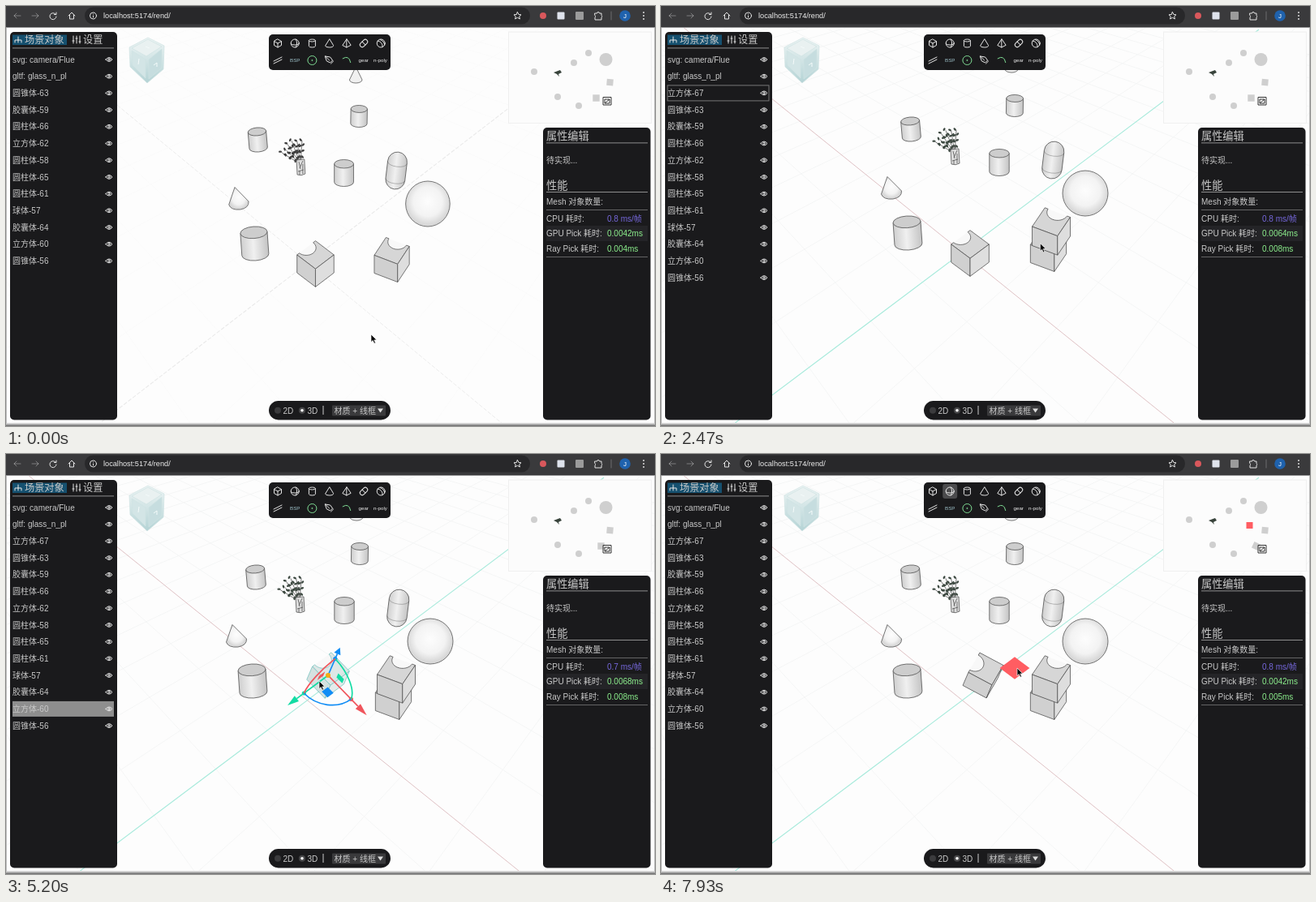
Recreate the animation shown at these times as an HTML page. Size 800 px wide and 518 px high, loop 8 s.

```html
<!DOCTYPE html>
<html lang="zh">
<head>
<meta charset="utf-8">
<title>Scene editor</title>
<style>
html, body { margin: 0; width: 100%; height: 100%; overflow: hidden; background: #fff; }
svg { display: block; width: 800px; height: 518px; }
text { font-family: "Liberation Sans", Arial, "Noto Sans CJK SC", "Noto Sans CJK", sans-serif; font-size: 10px; fill: #c9c9c9; }
.line { fill: none; stroke: #e4e4e4; stroke-width: 1; stroke-linecap: round; stroke-linejoin: round; }
.edge { stroke: #555; stroke-width: .8; stroke-linejoin: round; }
.title { font-size: 13.2px; }
.tab { font-size: 12.2px; }
.tiny { font-size: 6.2px; fill: #eee; }
.x-axis { stroke: #dcbcbf; stroke-width: .9; }
.y-axis { stroke: #a6eadb; stroke-width: 1.1; }
.grid { stroke: #f3f4f4; stroke-width: .8; fill: none; }
.leaf { fill: #3d4941; }
.plain .x-axis, .plain .y-axis { stroke: #eaeaea; stroke-dasharray: 5 2; }
.plain .leaf { fill: #3c3c3c; }
.plain .grid { stroke: #fafafa; }
.hot .edge { stroke: #63b9b5; }
.num { fill: #8df08d; }
</style>
</head>
<body>
<svg viewBox="0 0 800 518">
  <defs>
    <linearGradient id="side"><stop offset="0" stop-color="#cfcfcf"/><stop offset=".45" stop-color="#f0f0f0"/><stop offset="1" stop-color="#c4c4c4"/></linearGradient>
    <radialGradient id="ball" cx=".5" cy=".45"><stop offset="0" stop-color="#fdfdfd"/><stop offset=".65" stop-color="#f3f3f3"/><stop offset="1" stop-color="#d8d8d8"/></radialGradient>
    <linearGradient id="ice" x2="0" y2="1"><stop offset="0" stop-color="#eef5f5"/><stop offset="1" stop-color="#b4d3d5"/></linearGradient>
    <clipPath id="view"><rect y="27" width="800" height="487"/></clipPath>
  </defs>
  <rect width="800" height="518" fill="#fdfdfd"/>
  <g clip-path="url(#view)">
    <g id="scene"><g id="props"></g><g id="blocks"></g></g>
    <g id="gizmo"></g>
  </g>
  <g id="ui"></g>
  <g id="live"></g>
  <path id="cursor" d="M0 0V9.6L2.2 7.5 3.8 11.2 5.5 10.4 3.9 6.9H7Z" fill="#000" stroke="#fff" stroke-width=".7"/>
</svg>
<script>
const LOOP = 8000;
const TOOL = 1250, AIM = 1750, PLACE = 2300, PICK = 2900, CLEAR = 6850, TOOL_AGAIN = 7440, NEXT_TOOL = 7600, DROP = 7760;
const ORBIT = [70, 800], TILT = [3550, 4000], SLIDE = [4200, 4600], TURN = [5400, 6400];
const RED = '#f0555c', GREEN = '#12dca4', BLUE = '#118df5', GOLD = '#f2ac12', HOT = '#ff5d62';
const $ = id => document.getElementById(id);

const line = (d, extra = '') => `<path class="line" d="${d}" ${extra}/>`;
const text = (x, y, s, extra = '') => `<text x="${x}" y="${y}" ${extra}>${s}</text>`;
const rect = (x, y, w, h, fill, r = 0, extra = '') =>
  `<rect x="${x}" y="${y}" width="${w}" height="${h}" rx="${r}" fill="${fill}" ${extra}/>`;
const dot = (x, y, r, fill, extra = '') => `<circle cx="${x}" cy="${y}" r="${r}" fill="${fill}" ${extra}/>`;
const ring = (x, y, r) => dot(x, y, r, 'none', 'class="line"');
const poly = (pts, fill, extra = 'class="edge"') => `<polygon points="${pts.join(' ')}" fill="${fill}" ${extra}/>`;
const range = n => [...Array(n).keys()];
const random = n => Math.abs(Math.sin(n * 78.23) * 437.58) % 1;
const within = (t, from, to) => t >= from && t < to;

// Smooth 0..1 progress through a time span.
function ease(t, [from, to]) {
  const u = Math.min(1, Math.max(0, (t - from) / (to - from)));
  return u * u * (3 - 2 * u);
}

// Where the pointer rests or turns: time, x, y.
const stops = [
  [0, 450, 405], [800, 445, 330], [1300, 336, 45], [1800, 477, 291], [2350, 477, 291],
  [2950, 386, 307], [3500, 404, 295], [4100, 395, 282], [4600, 412, 248], [4880, 405, 383],
  [5200, 386, 280], [6550, 406, 308], [6900, 415, 386], [7480, 335, 46], [7930, 439, 264]
];
function pointer(t) {
  const i = Math.max(1, stops.findIndex(s => s[0] > t));
  if (t >= stops.at(-1)[0]) return stops.at(-1).slice(1);
  const [a, b] = [stops[i - 1], stops[i]], e = ease(t, [a[0], b[0]]);
  return [a[1] + (b[1] - a[1]) * e, a[2] + (b[2] - a[2]) * e];
}

// Orthographic view from 48 degrees above, turned by 45.
const PITCH = .835, DIAG = Math.SQRT1_2;
const project = ([x, y, z]) => [(x - y) * DIAG, (x + y) * DIAG * Math.sin(PITCH) - z * Math.cos(PITCH)];
// Screen vectors of a body's axes after tilting about y, then turning about its own z.
function axes(tilt, turn) {
  const [c, s, k, w] = [Math.cos(tilt), Math.sin(tilt), Math.cos(turn), Math.sin(turn)];
  return [[c * k, w, -s * k], [-c * w, k, s * w], [s, 0, c]].map(project);
}
const mix = (origin, ...terms) => terms.reduce((p, [n, v]) => [p[0] + n * v[0], p[1] + n * v[1]], origin);

// Cube with a spherical bite in the rear top edge on side -u.
function block(center, half, [r, g, b], u, v, active) {
  const at = (i, j, k) => mix(center, [i * half, r], [j * half, g], [k * half, b]);
  const onTop = (i, j) => mix(center, [half, b], [i * half, u], [j * half, v]);
  const bite = range(17).map(i => {
    const a = i / 16 * Math.PI;
    return onTop(-1 + .75 * Math.sin(a), .75 * Math.cos(a));
  });
  const [top, left, right] = active ? ['#d9e4e3', '#cfdddc', '#e0e9e8'] : ['#d6d6d6', '#d0d0d0', '#dedede'];
  return `<g class="${active ? 'hot' : ''}" opacity="${active ? .85 : 1}">` +
    poly(bite, '#f8f8f8', '') + poly([onTop(-1, 1), ...bite, onTop(-1, -1), onTop(1, -1), onTop(1, 1)], top) +
    poly([at(-1, 1, 1), at(1, 1, 1), at(1, 1, -1), at(-1, 1, -1)], left) +
    poly([at(1, 1, 1), at(1, -1, 1), at(1, -1, -1), at(1, 1, -1)], right) + '</g>';
}

function pose(t) {
  const slide = ease(t, SLIDE);
  return { center: [381 + 16 * slide, 305 - 32 * slide], frame: axes(.3 * ease(t, TILT), -.36 * ease(t, TURN)) };
}

function drawBlocks(t, [x, y]) {
  const { center, frame } = pose(t), [r, g] = frame;
  const still = axes(0, -.32), base = [477.5, 300], aiming = within(t, AIM, PLACE);
  let out = block(center, 16.5, frame, r, g, within(t, PICK, CLEAR));
  out += block(base, 16.5, still, still[1], still[0], aiming);
  if (t >= PLACE) out += block([481, 278], 17.5, still, still[1], still[0], false);
  const face = (mid, size, [p, q]) => [[1, 1], [1, -1], [-1, -1], [-1, 1]].map(([i, j]) => mix(mid, [i * size, p], [j * size, q]));
  if (aiming) out += poly(face(mix(base, [16.5, still[2]]), 16.5, still), '#fb3034', 'opacity=".85"');
  if (within(t, 1600, AIM) || t > DROP) out += poly(face([x - 3, y], 13, axes(0, 0)), HOT, '');
  $('blocks').innerHTML = out;
}

function drawGizmo(t) {
  if (!within(t, PICK, CLEAR)) { $('gizmo').innerHTML = ''; return; }
  const { center, frame } = pose(t), size = 42;
  const facing = t > 6000 ? -1 : 1;
  const [r, g, b] = frame.map((v, i) => v.map(n => n * size * (i ? 1 : facing)));
  const at = (p, i, q = p, j = 0) => mix(center, [i, p], [j, q]);
  const arc = (p, q, color) => `<path d="M${at(p, 1)}C${at(p, 1, q, .55)} ${at(p, .55, q, 1)} ${at(q, 1)}" fill="none" stroke="${color}" stroke-width="1.7"/>`;
  const pad = (p, q, color) => poly([at(p, .28, q, .28), at(p, .53, q, .28), at(p, .53, q, .53), at(p, .28, q, .53)], color, '');
  const arrow = (p, color) => {
    const len = Math.hypot(...p), across = [-p[1] / len, p[0] / len], neck = at(p, 1.3);
    return `<path d="M${center}L${neck}" stroke="${color}" stroke-width="1.7"/>` + dot(...at(p, 1), 2.6, color) +
      poly([at(p, 1.68), mix(neck, [4.3, across]), mix(neck, [-4.3, across])], color, '');
  };
  $('gizmo').innerHTML = pad(b, g, RED) + pad(b, r, GREEN) + pad(r, g, BLUE) +
    arrow(g, GREEN) + arrow(r, RED) + arrow(b, within(t, TILT[1], SLIDE[1]) ? GOLD : BLUE) +
    arc(r, g, t > TURN[0] ? GOLD : BLUE) + arc(b, r, within(t, ...TILT) ? GOLD : GREEN) + arc(b, g, RED) + dot(...center, 3, GOLD);
}

function ground() {
  const o = [377, 300], ends = [[1044, -207], [-290, -207]];
  const d = ends.flatMap((along, n) => range(22).filter(i => i !== 7).map(i => {
    const k = (i - 7) * .075, far = ends[1 - n];
    const p = mix([0, 0], [1 / (1 + k), o], [k / (1 + k), along]);
    return `M${mix([0, 0], [3, p], [-2, far])}L${far}`;
  }));
  return `<path class="grid" d="${d.join('')}"/><path class="x-axis" d="M16 17L632 514"/><path class="y-axis" d="M77 525L737 29"/>`;
}

function cylinder(x, y, rx, h, lean) {
  const ry = rx * .43, top = y - h / 2 + ry, low = y + h / 2 - ry;
  return `<g class="edge" transform="rotate(${lean} ${x} ${y})">
    <path fill="url(#side)" d="M${x - rx} ${top}V${low}A${rx} ${ry} 0 0 0 ${x + rx} ${low}V${top}Z"/>
    <ellipse cx="${x}" cy="${top}" rx="${rx}" ry="${ry}" fill="#cdcdcd"/></g>`;
}

function plant() {
  const stems = range(6).map(n => {
    const a = -2.6 + n * .22, len = 24 + 9 * random(n + 1);
    const [dx, dy] = [len * Math.cos(a), len * Math.sin(a)];
    const leaves = range(6).map(i => {
      const u = 1 - i * .13, side = i % 2 ? 1.8 : -1.8;
      return `<ellipse class="leaf" rx="2.1" ry="1.2" transform="translate(${362 + dx * u + side} ${182 + dy * u + side * .6}) rotate(${random(i + n * 9) * 180})"/>`;
    });
    return `<path class="edge" d="M362 182l${dx} ${dy}"/>` + leaves.join('');
  });
  return stems.join('') + `<path d="M357 177L358 195Q363 197 368 194L367 176Z" fill="#dedede" class="edge"/>
    <path class="edge" fill="none" d="M360 179L362 188M365 178L361 187M359 191L366 189M365 182V194M361 190V195"/>`;
}

$('props').innerHTML = ground() + `<path class="edge" fill="#f0f0f0" d="M432 62L424 78A8 4 0 0 0 440 78Z"/>` +
  cylinder(436, 123, 10.4, 27, 1) + cylinder(308, 152, 11.5, 30, -5) + plant() + cylinder(417, 193, 12.2, 33, 0) +
  `<g class="edge" transform="rotate(7 483 190)">${rect(471, 167, 24.5, 46, 'url(#side)', 12.2)}<path fill="none" opacity=".45" d="M471 180A12 5 0 0 0 495.5 180M471 201A12 5 0 0 0 495.5 201"/></g>` +
  dot(523, 231, 28, 'url(#ball)', 'class="edge"') +
  `<path class="edge" fill="url(#ball)" d="M279 210.5L271.5 232Q274 239 286 238Q297 236 296.5 228Z"/>` + cylinder(304, 280, 17, 42, -4);

const names = ['svg: camera/Flue', 'gltf: glass_n_pl', '圆锥体-63', '胶囊体-59', '圆柱体-66', '立方体-62', '圆柱体-58',
  '圆柱体-65', '圆柱体-61', '球体-57', '胶囊体-64', '立方体-60', '圆锥体-56'];
const namesAfter = names.toSpliced(2, 0, '立方体-67');
const rowY = i => 66 + i * 20.7;
const eye = y => line(`M123 ${y}Q127 ${y - 5} 131 ${y}Q127 ${y + 5} 123 ${y}Z`) + ring(127, y, 1.3);
const list = items => items.map((s, i) => text(8, rowY(i) + 3.6, s) + eye(rowY(i))).join('');

function browser() {
  return rect(0, 0, 800, 26.5, '#3a3a3c') + rect(97, 1.5, 549, 21, '#28282a', 10.5) +
    line('M18 12H10M13 9L10 12 13 15M32 12H40M37 9L40 12 37 15', 'opacity=".4"') +
    line('M61 10A4 4 0 1 0 62 13M62 8V10.5H59.5M77 12L81 8 85 12M78.5 11V16H83.5V11') +
    ring(107.5, 12, 4) + line('M107.5 12V14M107.5 10V10.1') +
    text(120, 15.4, 'localhost:5174/rend/', 'style="font-size:9.2px;fill:#eee"') +
    line('M630.5 7.5L632 10.5 635 10.8 632.7 12.9 633.4 16 630.5 14.3 627.6 16 628.3 12.9 626 10.8 629 10.5Z') +
    dot(662, 12, 4, '#d9585c') + rect(679.5, 7.5, 9, 9, '#dfe3ec', 1) + rect(702, 7, 10, 10, '#9b9b9b', 1) +
    line('M726 9H728.5A1.5 1.5 0 0 1 731.5 9H734V11.5A1.5 1.5 0 0 1 734 14V17H726V14A1.5 1.5 0 0 0 726 11.5Z') +
    line('M746 7V17', 'opacity=".3"') + dot(763, 12, 6.8, '#1f62ad') + text(761, 15, 'J', 'style="font-size:8px;fill:#fff"') +
    range(3).map(i => dot(786, 8 + 4 * i, 1, '#ddd')).join('') +
    rect(0, 514.5, 800, 3.5, '#c4c4c4') + rect(0, 516.5, 800, 1.5, '#777') + rect(0, 27, 1, 488, '#bbb') + rect(799, 27, 1, 488, '#bbb');
}

function viewCube() {
  return `<g stroke="#cfe2e3" stroke-width=".7" stroke-linejoin="round"><path fill="url(#ice)" d="M175 39L195 49 194 78 174 95 153 75 152 51Z"/>
    <path fill="#e9f1f1" d="M175 41L192 50 173 62 155 52Z"/><path fill="#d3e5e6" d="M155 55L172 66V89L156 73Z"/>
    <path fill="#c6dddf" d="M176 66L192 53V76L176 90Z"/></g>
    <path fill="none" stroke="#f4fafa" d="M164 65L163 72M182 73L186 70V75M172 50L177 52"/>`;
}

function toolbar() {
  const [a, b, c, d, e, f, g] = range(7).map(i => 335 + i * 21.2);
  return rect(324, 35, 150, 44, '#1a1a1c', 5) + rect(0, 37, 18, 18, '#4b4b4d', 3, 'id="tool"') +
    line(`M${a} 41l4.5 2.5v5l-4.5 2.5 -4.5 -2.5v-5ZM${a - 4.5} 43.5l4.5 2.5 4.5 -2.5M${a} 46v5`) +
    ring(b, 46, 5) + line(`M${b - 5} 46a5 2 0 0 0 10 0M${b + 1} 41q3 5 0 10`) +
    line(`M${c - 4} 42.5v7a4 1.5 0 0 0 8 0v-7a4 1.5 0 0 0 -8 0a4 1.5 0 0 0 8 0`) +
    line(`M${d} 41l-5 8a5 2 0 0 0 10 0Z`) + line(`M${e} 41l-5 7.5 5 2.5 5 -2.5Zv10`) +
    `<g transform="rotate(45 ${f} 46)">${rect(f - 2.8, 40.5, 5.6, 11, 'none', 2.8, 'class="line"')}${line(`M${f - 2.8} 46h5.6`)}</g>` +
    ring(g, 46, 5) + line(`M${g - 4} 43q6 1 6 7.5M${g - 1} 41.5q5 1.5 5.5 6.5`) +
    line(`M${a - 5} 68l10 -5M${a - 5} 71l10 -5`) + text(350, 69.3, 'BSP', 'class="tiny" style="fill:#9fc3cb"') +
    `<g style="stroke:#7fdc94" fill="none">${dot(c, 67, 5.5, 'none')}${dot(c, 67, .6, 'none')}<path d="M${e - 5} 65q8 -5 10 5"/></g>` +
    line(`M${d - 5} 62l6 1 3 4 -3 3 -4 -2Zl5 5M${d + 2} 71l3 -3`) + text(434.5, 69, 'gear', 'class="tiny"') + text(453, 69, 'n-poly', 'class="tiny"');
}

function miniMap() {
  const grey = '#cfcfcf', spots = [[651, 81], [700, 70], [718, 58], [680, 112], [706, 123]];
  return rect(619.5, 32, 176, 112.5, '#fcfcfc', 0, 'stroke="#f0f0f0"') +
    spots.map(p => dot(...p, 4, grey)).join('') + dot(739.5, 66, 8, grey) +
    '<path d="M675 82L683 79 685 82 681 84 682 87 679 84Z" fill="#39443c"/>' +
    rect(740.5, 90, 8, 8, grey, 0, 'id="mapTop" transform="rotate(5 744 94)"') + rect(-4.2, -4.2, 8.4, 8.4, grey, 0, 'id="mapBlock"') +
    '<path d="M736 112.5H746V122H736ZM738 115H744V120H738ZM738 120L744 115" fill="none" stroke="#333"/>' +
    rect(721.5, 84, 8, 8, HOT, 0, 'id="mapMark"');
}

function sidePanels() {
  const rule = (y, x = 666, color = '#aaa') => rect(x, y, 125, .8, color);
  return rect(5, 32, 132, 478.5, '#1a1a1c', 5) + rect(8, 35.5, 67, 12.5, '#15506f') +
    line('M15 38V42M11 45V42H19V45M15 42V45') + text(23, 46, '场景对象', 'class="tab"') +
    line('M83 37V46M87 37V46M91 37V46M82 43H84M86 40H88M90 44H92') + text(95, 46, '设置', 'class="tab"') + rule(51.5, 8) +
    rect(662, 150, 132.5, 360.5, '#1a1a1c', 5) + text(666, 164.5, '属性编辑', 'class="title"') + rule(168.5) + text(666, 194, '待实现...') +
    text(666, 226, '性能', 'class="title"') + rule(229) + text(666, 244.8, 'Mesh 对象数量:') + rule(251, 666, '#777') + rect(666, 271, 125, 19, '#242427') +
    ['CPU', 'GPU Pick', 'Ray Pick'].map((s, i) => text(666, 265.6 + 18.8 * i, s + ' 耗时:')).join('') + rule(309, 666, '#777');
}

function modeBar() {
  return rect(324, 487, 150, 23.5, '#1a1a1c', 11.7) + dot(335, 498.7, 4, '#3b3b3d') + dot(365, 498.7, 4, '#48484a') + dot(365, 498.7, 1.8, '#fff') +
    text(341.5, 502.5, '2D') + text(371.5, 502.5, '3D') + rect(390.5, 493, 1, 11, '#ccc') + rect(402, 492.5, 66, 13, '#3a3a3c', 1) +
    text(404.5, 502.6, '材质 + 线框') + '<path d="M458 496.5H465L461.5 501.5Z" fill="#ddd"/>';
}

$('ui').innerHTML = browser() + viewCube() + miniMap() + sidePanels() + toolbar() + modeBar();
$('live').innerHTML = '<rect id="row" x="8" width="125" height="19"/>' +
  `<g id="before">${list(names)}</g><g id="after">${list(namesAfter)}</g>` +
  ['cpu', 'gpu', 'ray'].map((id, i) => text(741, 265.6 + 18.8 * i, '', `id="${id}" class="num"`)).join('');
$('cpu').style.fill = '#7668dc';

const show = (id, on) => { $(id).style.display = on ? '' : 'none'; };

// Pick costs swell while the scene is being edited, refreshed a few times a second.
function drawStats(t) {
  const load = Math.sin(Math.PI * Math.floor(t / 200) * 200 / LOOP);
  $('cpu').textContent = (within(t, SLIDE[1], TURN[0]) ? '0.7' : '0.8') + ' ms/帧';
  $('gpu').textContent = (.0042 + .0033 * load ** 2).toFixed(4) + 'ms';
  $('ray').textContent = (.004 + Math.min(.004, .008 * load)).toFixed(3) + 'ms';
}

function drawRow(t) {
  const chosen = within(t, PICK, CLEAR);
  const name = chosen ? '立方体-60' : within(t, AIM, PLACE) ? '立方体-62' : within(t, PLACE + 100, PICK - 150) ? '立方体-67' : '';
  show('row', name);
  if (!name) return;
  $('row').setAttribute('y', rowY((t < PLACE ? names : namesAfter).indexOf(name)) - 9.5);
  $('row').setAttribute('fill', chosen ? '#8e8e8e' : 'none');
  $('row').setAttribute('stroke', chosen ? 'none' : '#777');
}

function render(t) {
  const start = 1 - ease(t, ORBIT), spot = pointer(t);
  $('scene').setAttribute('transform', `translate(${10 * start} ${13 * start}) scale(${1 - .025 * start} 1)`);
  $('scene').setAttribute('class', t < ORBIT[0] ? 'plain' : '');
  $('cursor').setAttribute('transform', `translate(${spot})`);
  drawBlocks(t, spot);
  drawGizmo(t);
  drawStats(t);
  drawRow(t);
  show('before', t < PLACE);
  show('after', t >= PLACE);
  show('mapMark', t > DROP);
  $('mapTop').setAttribute('fill', within(t, AIM, PLACE) ? '#ff5056' : '#cfcfcf');
  $('mapBlock').setAttribute('transform', `translate(${727.5 + 6 * ease(t, SLIDE)} 113.5) rotate(${25 * ease(t, TURN)})`);
  show('tool', within(t, TOOL, PLACE) || t >= TOOL_AGAIN);
  $('tool').setAttribute('x', t >= NEXT_TOOL ? 347.2 : 326);
}

const began = performance.now();
function tick() {
  render((performance.now() - began) % LOOP);
  requestAnimationFrame(tick);
}
tick();
</script>
</body>
</html>
```
